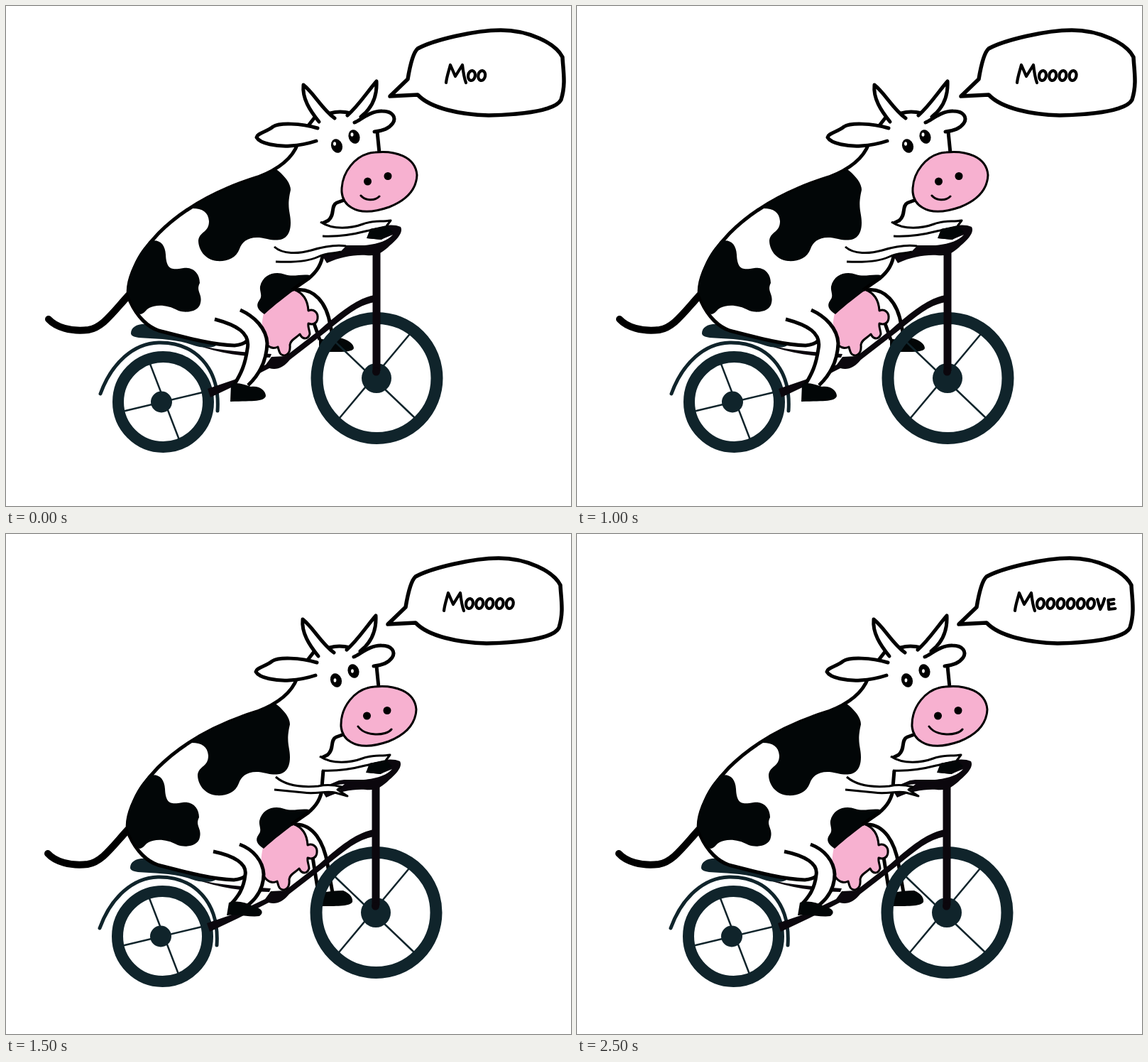
An HTML page that plays this animation: 796 px wide and 704 px high, repeating every 3000 ms.

```html
<!DOCTYPE html>
<html lang="en">
<head>
<meta charset="utf-8">
<title>Cycling cow</title>
<style>
  html, body { margin: 0; width: 100%; height: 100%; overflow: hidden; background: #fff; }
  svg { display: block; width: 796px; height: 704px; }
  .ink { fill: none; stroke: #000; stroke-width: 5; stroke-linecap: round; stroke-linejoin: round; }
  .flat { stroke-linecap: butt; }
  .thin { stroke-width: 3; }
  .skin { fill: #fff; }
  .black { fill: #020607; }
  .bar { fill: #0b070d; }
  .teal { fill: #10242b; }
  .rim { fill: none; stroke: #10242b; stroke-linecap: round; }
  .pink { fill: #f7b1d0; }
</style>
</head>
<body>
<svg viewBox="0 0 796 704" role="img">
  <g id="bubble">
    <path class="ink" style="stroke-width:5.5" d="M541 127L566 103C569 85 573 66 580 60C602 48 660 34 697 34C736 34 774 52 784 72C785 92 789 110 782 132C774 148 722 153 680 154C640 153 598 144 580 125Z"/>
    <g id="words" class="ink" style="stroke-width:4.2"></g>
  </g>

  <g id="ride">
    <!-- far leg -->
    <g class="even">
      <path class="ink flat" d="M407 400C434 396 452 418 457 450L461 468M433 444L442 470"/>
      <path class="black" d="M441 487V468C450 471 460 470 470 467C483 470 490 476 490 482C488 488 470 487 441 487Z"/>
    </g>
    <g class="odd">
      <path class="ink flat" d="M407 400C434 398 449 426 454 456L461 496M433 446L440 490"/>
      <path class="black" d="M446 515V496C456 494 466 493 476 493C486 497 490 504 489 509C486 515 470 515 446 515Z"/>
    </g>

    <!-- wheels -->
    <path class="rim" stroke-width="5" d="M133 546C149 502 180 475 215 474C265 473 302 508 298 570"/>
    <g id="wheels"></g>

    <!-- frame -->
    <path class="bar" d="M268 477C304 486 336 487 374 490L372 495C336 494 300 489 268 477Z"/>
    <path class="bar" d="M284 539L322 526L366 505L374 494L394 493L442 456C470 432 493 412 519 407V417C492 422 474 441 448 461L400 498C391 509 382 513 371 510L328 532L288 551Z"/>
    <path class="ink flat" style="stroke:#0b070d;stroke-width:11" d="M522 343V514"/>
    <circle class="bar" cx="521.5" cy="515" r="5.5"/>
    <path class="teal" d="M176 461C176 451 188 445 206 449L300 474C296 482 279 483 262 477C237 468 209 469 187 467C180 466 176 464 176 461Z"/>

    <!-- tail and body -->
    <path class="ink" style="stroke-width:10" d="M173 407C150 432 136 453 116 456C91 459 70 452 60 441"/>
    <path class="skin" d="M411 194C403 216 381 231 355 241C300 258 250 285 215 320C180 358 167 400 174 416C185 438 200 452 215 457C250 466 290 477 322 478Q339 477 341 470L362 434L428 382Q447 366 447 306L465 279L526 206L523 177L480 150L430 160Z"/>
    <path class="ink" d="M411 194C403 216 381 231 355 241C300 258 250 285 215 320C180 356 166 396 175 416C185 438 200 452 215 457C250 466 290 477 322 478Q334 477 340 471"/>
    <path class="ink flat" d="M477 273L466 277C457 281 464 294 454 302L446 306"/>
    <path class="black" d="M381 230C390 237 401 248 401 259C395 285 401 290 401 305C401 330 385 332 368 328C345 322 333 330 329 342C324 356 310 360 297 359C280 357 271 343 271 330C273 317 286 319 286 303C285 289 275 284 259 285C300 256 355 243 381 230Z"/>
    <path class="black" d="M203 331C217 328 224 336 225 350C226 374 236 371 250 369C265 367 273 378 273 390C267 402 277 405 274 418C272 430 255 433 243 429C225 419 210 421 202 425C196 428 196 433 189 434C181 430 176 415 171 402C172 375 187 345 203 331Z"/>
    <path class="pink" d="M398 398C417 403 425 412 426 429C433 426 440 431 439 440C438 448 431 449 426 447C425 452 428 457 428 462C425 470 418 470 414 462C408 468 401 470 400 477C401 487 397 492 391 492C385 491 385 486 383 480C372 485 363 475 362 465C359 455 361 440 364 428Z"/>
    <path class="ink thin" d="M405 399C417 403 425 412 426 429C433 426 440 431 439 440C438 448 431 449 426 447C425 452 428 457 428 462C425 470 418 470 414 462C408 468 401 470 400 477C401 487 397 492 391 492C385 491 385 486 383 480C372 485 363 475 362 465"/>
    <path class="black" d="M428 379C420 393 396 405 364 434C355 428 351 422 357 414C362 408 357 402 358 395C362 377 380 373 393 378C405 382 415 377 428 379Z"/>
    <path class="ink flat" d="M447 346C445 364 438 374 426 384L403 400"/>
    <path class="ink flat odd" d="M448 324L446 348"/>

    <!-- near leg -->
    <g class="even">
      <path class="skin" d="M294 441C324 449 345 460 340 483C337 505 331 518 321 534H341C357 519 367 500 368 475C367 454 350 437 330 428Z"/>
      <path class="ink flat" d="M294 441C324 449 345 460 340 483C337 505 331 518 321 534M330 428C350 437 367 454 368 475C367 500 357 519 341 534"/>
      <path class="black" d="M316 557L317 532C326 529 336 533 345 536C356 534 366 541 366 549C364 557 350 556 316 557Z"/>
    </g>
    <g class="odd">
      <path class="skin" d="M293 438C322 444 341 455 338 471C336 490 328 502 317 513L340 515C356 503 364 488 364 470C363 451 349 435 330 428Z"/>
      <path class="ink flat" d="M293 438C322 444 341 455 338 471C336 490 328 502 317 513M330 428C349 435 363 451 364 470C364 488 356 503 340 515"/>
      <path class="black" d="M312 528L315 510C326 507 338 509 349 515C362 518 365 524 358 529C345 531 330 526 312 528Z"/>
    </g>

    <!-- head -->
    <path class="ink" d="M427 167L434 158M457 151Q470 147 486 151M523 177L526 207"/>
    <path class="ink skin" style="fill:#fff" d="M441 163C428 147 417 130 419 111C435 124 444 144 463 158"/>
    <path class="ink skin" style="fill:#fff" d="M481 154C497 140 508 122 522 106C523 126 517 143 500 156"/>
    <path class="ink skin" style="fill:#fff" d="M439 172C415 165 385 164 376 170C366 178 354 179 353 185C358 194 382 198 400 197C415 196 428 193 437 190"/>
    <path class="ink skin" style="fill:#fff" d="M491 164C499 161 514 147 530 148C545 148 550 157 545 165C540 172 530 176 519 177"/>
    <g id="eyes"></g>
    <path class="ink thin pink" d="M473 262C472 235 492 208 520 206C548 203 577 212 579 238C578 262 560 275 540 283C520 290 500 292 487 284C478 279 474 272 473 262Z"/>
    <circle cx="509.5" cy="247" r="5.5"/>
    <circle cx="538" cy="239.500" r="5.5"/>
    <path class="ink thin even" d="M500 267C506 274 519 275 526 268"/>
    <path class="ink thin odd" d="M497 262C507 276 536 276 544 266"/>

    <!-- handlebar and arms -->
    <path class="bar" d="M514 313C530 309 546 306 556 311C560 318 552 328 541 337C532 346 522 353 508 351C490 350 472 353 452 362L444 349L470 338L508 333Z"/>
    <path class="skin" d="M474 337L480 329L508 327L528 329L545 322C537 331 524 335 505 337Z"/>
    <path class="skin" d="M443 304C461 316 487 313 503 307C516 302 528 304 542 302L536 310L513 314L508 318L447 325Z"/>
    <path class="ink flat thin" d="M443 304C461 316 487 313 503 307C516 302 528 304 542 302L536 310M446 324C468 325 488 322 507 317L532 312"/>
    <path class="black" d="M513 314L536 309L545 318L529 329L508 327Z"/>
    <g class="even">
      <path class="skin" d="M378 339C390 350 412 349 430 344C450 338 465 336 479 338L470 347C462 349 452 347 440 353C425 360 400 361 380 360Z"/>
      <path class="ink flat thin" d="M378 339C390 350 412 349 430 344C450 338 465 336 479 338M380 360C400 361 425 360 440 353C452 347 462 349 472 346"/>
    </g>
    <g class="odd">
      <path class="skin" d="M381 333C396 346 418 348 441 346C455 343 466 345 478 343L470 350L477 358L464 354C450 352 438 358 420 355L379 351Z"/>
      <path class="ink flat thin" d="M381 333C396 346 418 348 441 346C455 343 466 345 474 347L468 351L482 360L464 355C450 352 438 358 420 355L379 351"/>
    </g>
  </g>
</svg>
<script>
const $ = id => document.getElementById(id);
const BEAT = 500, PITCH = 14.2;
const calls = [[2, ""], [3, ""], [4, ""], [5, ""], [5, "v"], [6, "ve"]];

const strokes = {
  M: "M620 108C621 99 624 91 626 83L633 99L643 83C644 92 645 100 648 108",
  v: "m-5 -6l4 14q4 -7 6 -15",
  e: "m4 -6l-8 1l1 13l9 -1m-9 -6l7 -1"
};

function wheel(x, y, r, width, hubX, hub, spokes) {
  return `<path class="rim" stroke-width="2.5" d="${spokes}"/>
    <circle class="rim" stroke-width="${width}" cx="${x}" cy="${y}" r="${r}"/>
    <circle class="teal" cx="${hubX}" cy="${y}" r="${hub}"/>`;
}

function eye(x, y) {
  return `<ellipse cx="${x}" cy="${y}" rx="7.8" ry="10" transform="rotate(-20 ${x} ${y})"/>
    <ellipse class="skin even" cx="${x - 3}" cy="${y - 3}" rx="2" ry="2.8"/>
    <ellipse class="skin odd" cx="${x - 1.5}" cy="${y}" rx="1.9" ry="2.8"/>`;
}

function lettering(count, ending) {
  let x = 656, out = `<path d="${strokes.M}"/>`;
  for (let i = 0; i < count; i++, x += PITCH)
    out += `<ellipse cx="${x}" cy="98" rx="4.9" ry="7" transform="rotate(10 ${x} 98)"/>`;
  for (const c of ending) {
    out += `<path d="M${x} 98${strokes[c]}"/>`;
    x += PITCH;
  }
  return out;
}

$("wheels").innerHTML =
  wheel(221.5, 557.5, 63.5, 16, 219, 15, "M203 504L243 608M168 570L277 544") +
  wheel(522.5, 524, 84.5, 17, 522, 21, "M568 463L470 580M465 474L575 579");
$("eyes").innerHTML = eye(466, 197) + eye(490.5, 184);

const poses = ["even", "odd"].map(c => document.querySelectorAll("." + c));
let shown = -1;

function draw(ms) {
  const step = Math.floor(ms / BEAT) % calls.length;
  if (step === shown) return;
  shown = step;
  const odd = step % 2, [count, ending] = calls[step];
  poses.forEach((parts, k) => parts.forEach(p => p.style.display = k === odd ? "" : "none"));
  $("ride").setAttribute("transform", odd ? "translate(-1 9)" : "");
  $("bubble").setAttribute("transform", odd ? "translate(-3 0)" : "");
  $("words").innerHTML = lettering(count, ending);
  $("words").setAttribute("aria-label", "M" + "o".repeat(count) + ending);
}

const start = performance.now();
function tick() {
  draw(performance.now() - start);
  requestAnimationFrame(tick);
}
tick();
</script>
</body>
</html>
```
